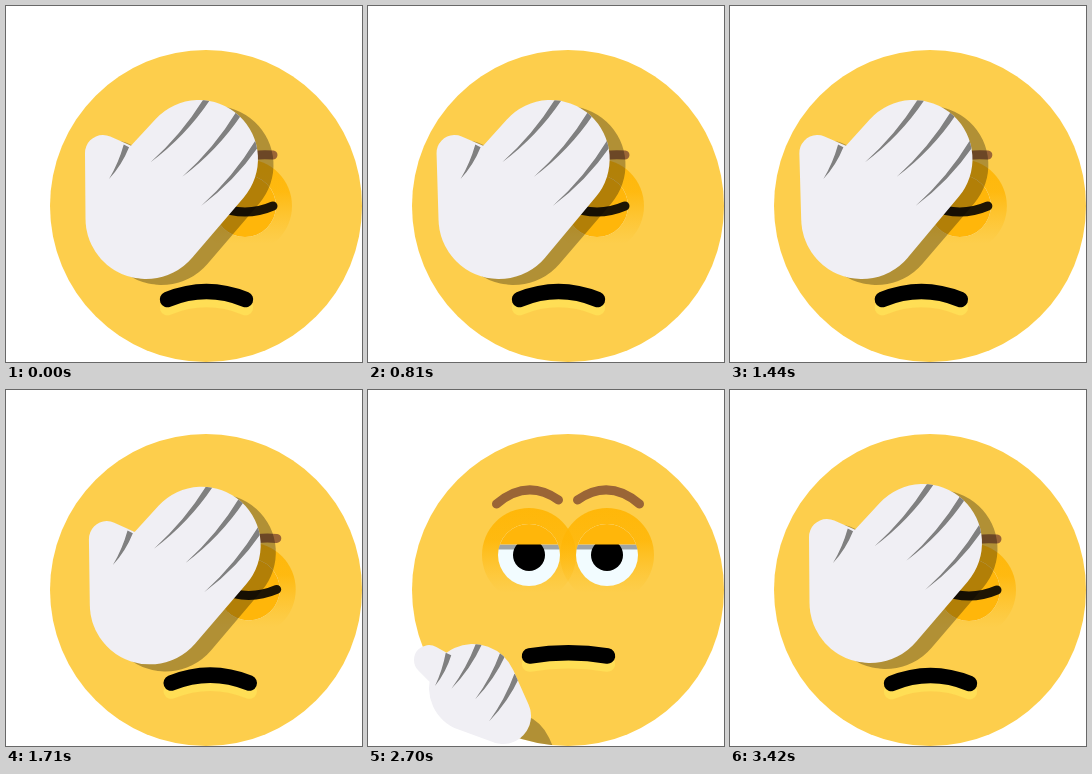
Write an HTML page with a canvas that moves like this. It is 356 px wide and 356 px high and loops after 3.51 s.

```html
<!DOCTYPE html>
<html lang="en">
<head>
<meta charset="utf-8">
<title>Facepalm</title>
<style>
  html, body { margin: 0; width: 100%; height: 100%; overflow: hidden; background: #fff; }
  canvas { display: block; width: 356px; height: 356px; }
</style>
</head>
<body>
<canvas id="stage"></canvas>
<script>
const SIZE = 356, STEP = 90, LOOP = 3510;
const FACE = '#fdce4c', LID = '#ffb60a', GLOVE = '#f0eff4';

// The glove is three circles, joined thumb to palm and palm to fingers
const RAISED = {
  thumb: { x: 97, y: 147, r: 18 },
  palm: { x: 140, y: 212.5, r: 60.5 },
  fingers: { x: 193, y: 153, r: 59 }
};
const LOWERED = {
  thumb: { x: 61, y: 270, r: 15 },
  palm: { x: 135, y: 326, r: 28 },
  fingers: { x: 105, y: 298, r: 44 }
};

const canvas = document.getElementById('stage');
const ctx = canvas.getContext('2d');
const ratio = window.devicePixelRatio || 1;
canvas.width = canvas.height = SIZE * ratio;

const mix = (a, b, p) => a + (b - a) * p;
const clamp = v => Math.min(1, Math.max(0, v));

function ease(t, from, to) {
  const u = clamp((t - from) / (to - from));
  return u * u * (3 - 2 * u);
}

// Head shake that swells quickly and dies away
function shakeAt(t) {
  const swell = clamp(t / 360) ** 2;
  const fade = 1 - clamp(t / 1860) ** 3;
  return 18 * swell * fade * Math.cos(Math.PI * (t - 360) / 348);
}

const loweredAt = t => ease(t, 1680, 2070) - ease(t, 3150, 3420);
const blinksAt = t => t >= 2700 && t < 2790;

function disc(x, y, r, fill) {
  ctx.beginPath();
  ctx.arc(x, y, r, 0, Math.PI * 2);
  ctx.fillStyle = fill;
  ctx.fill();
}

function arch(x0, y0, cx, cy, x1, y1, width, color) {
  ctx.beginPath();
  ctx.moveTo(x0, y0);
  ctx.quadraticCurveTo(cx, cy, x1, y1);
  ctx.lineWidth = width;
  ctx.lineCap = 'round';
  ctx.strokeStyle = color;
  ctx.stroke();
}

function drawGlow(x, y) {
  const g = ctx.createLinearGradient(0, y - 47, 0, y + 47);
  g.addColorStop(0, 'rgba(255,182,6,.95)');
  g.addColorStop(.35, 'rgba(255,182,6,.85)');
  g.addColorStop(.9, 'rgba(255,190,30,0)');
  disc(x, y, 47, g);
}

function drawEye(x, y, open, lidTop) {
  const lid = mix(y + 32, y + lidTop, open);
  ctx.save();
  disc(x, y, 31, '#f2fcff');
  ctx.clip();
  disc(x, y, 16, '#000');
  ctx.fillStyle = 'rgba(0,0,0,.35)';
  ctx.fillRect(x - 32, lid, 64, 5);
  ctx.fillStyle = LID;
  ctx.fillRect(x - 32, y - 32, 64, lid - y + 32);
  ctx.restore();
  if (open < .05) arch(x - 28, y, x, y + 12, x + 28, y, 9, '#1f1604');
}

function drawFeatures(p, lidTop) {
  const eyeY = mix(200, 165, p);
  const open = clamp((p - .3) / .7);
  for (const x of [161, 239]) drawGlow(x, eyeY);
  for (const x of [161, 239]) drawEye(x, eyeY, open, lidTop);

  for (const side of [-1, 1]) {
    const at = dx => 200 + side * dx;
    arch(at(9.5), mix(158, 110, p), at(41), mix(147, 88, p),
      at(mix(67, 71.5, p)), mix(149, 114, p), 9, '#9a6536');
  }

  const endY = mix(293.5, 266, p), midY = mix(277.5, 259.5, p);
  for (const [dy, color] of [[8, '#ffde55'], [0, '#000']])
    arch(161.5, endY + dy, 200.5, midY + dy, 239.5, endY + dy, 15.5, color);
}

// Outline around two circles and their outer tangents
function addHull(path, a, b) {
  const dx = b.x - a.x, dy = b.y - a.y;
  const dir = Math.atan2(dy, dx);
  const spread = Math.acos((a.r - b.r) / Math.hypot(dx, dy));
  path.moveTo(a.x + a.r * Math.cos(dir + spread), a.y + a.r * Math.sin(dir + spread));
  path.arc(a.x, a.y, a.r, dir + spread, dir - spread + Math.PI * 2);
  path.arc(b.x, b.y, b.r, dir - spread, dir + spread);
  path.closePath();
}

function glovePath({ thumb, palm, fingers }) {
  const path = new Path2D();
  addHull(path, thumb, palm);
  addHull(path, palm, fingers);
  return path;
}

// Interpolated glove; swing leans its upper parts further sideways
function poseGlove(p, swing) {
  const glove = {};
  for (const part in RAISED) {
    const a = RAISED[part], b = LOWERED[part];
    const y = mix(a.y, b.y, p);
    const lean = 1 + .0025 * (212 - y);
    glove[part] = { x: mix(a.x, b.x, p) + swing * lean, y, r: mix(a.r, b.r, p) };
  }
  return glove;
}

function drawCrease(x0, y0, x1, y1) {
  const len = Math.hypot(x1 - x0, y1 - y0);
  const nx = (y0 - y1) / len, ny = (x1 - x0) / len;
  const mx = (x0 + x1) / 2 + nx * len * .08, my = (y0 + y1) / 2 + ny * len * .08;
  ctx.beginPath();
  ctx.moveTo(x0, y0);
  ctx.quadraticCurveTo(mx - nx * 2, my - ny * 2, x1 - nx * 3, y1 - ny * 3);
  ctx.lineTo(x1 + nx * 3, y1 + ny * 3);
  ctx.quadraticCurveTo(mx + nx * 2, my + ny * 2, x0, y0);
  ctx.fill();
}

function drawCreases({ thumb, fingers }, p) {
  drawCrease(thumb.x + 6, thumb.y + 26, thumb.x + thumb.r * 1.3, thumb.y - thumb.r * .4);
  const reach = fingers.r * 1.04;
  for (let i = 0; i < 3; i++) {
    const angle = (-82 + 33 * i) * Math.PI / 180;
    const x = fingers.x + reach * Math.cos(angle);
    const y = fingers.y + reach * Math.sin(angle);
    drawCrease(x - mix(57, 28, p), y + mix(64, 46, p), x, y);
  }
}

function drawHand(p, shake) {
  ctx.save();
  ctx.beginPath();
  ctx.arc(200, 200, 156, 0, Math.PI * 2);
  ctx.clip();
  ctx.translate(shake + mix(15.5, 36, p), mix(6, 68, p));
  ctx.fillStyle = 'rgba(0,0,0,.3)';
  ctx.fill(glovePath(poseGlove(p, 0)));
  ctx.restore();

  const glove = poseGlove(p, shake * (1 + .01 * shake));
  const outline = glovePath(glove);
  ctx.save();
  ctx.fillStyle = GLOVE;
  ctx.fill(outline);
  ctx.clip(outline);
  ctx.fillStyle = '#808080';
  drawCreases(glove, p);
  ctx.restore();
}

function draw(t) {
  const p = loweredAt(t);
  const shake = shakeAt(t);
  ctx.setTransform(ratio, 0, 0, ratio, 0, 0);
  ctx.fillStyle = '#fff';
  ctx.fillRect(0, 0, SIZE, SIZE);
  disc(200, 200, 156, FACE);
  ctx.save();
  ctx.translate(shake, 0);
  drawFeatures(p, blinksAt(t) ? -10.5 : -13);
  ctx.restore();
  drawHand(p, shake);
}

const start = performance.now();
function tick() {
  const t = (performance.now() - start) % LOOP;
  draw(Math.floor(t / STEP) * STEP);
  requestAnimationFrame(tick);
}
tick();
</script>
</body>
</html>
```
